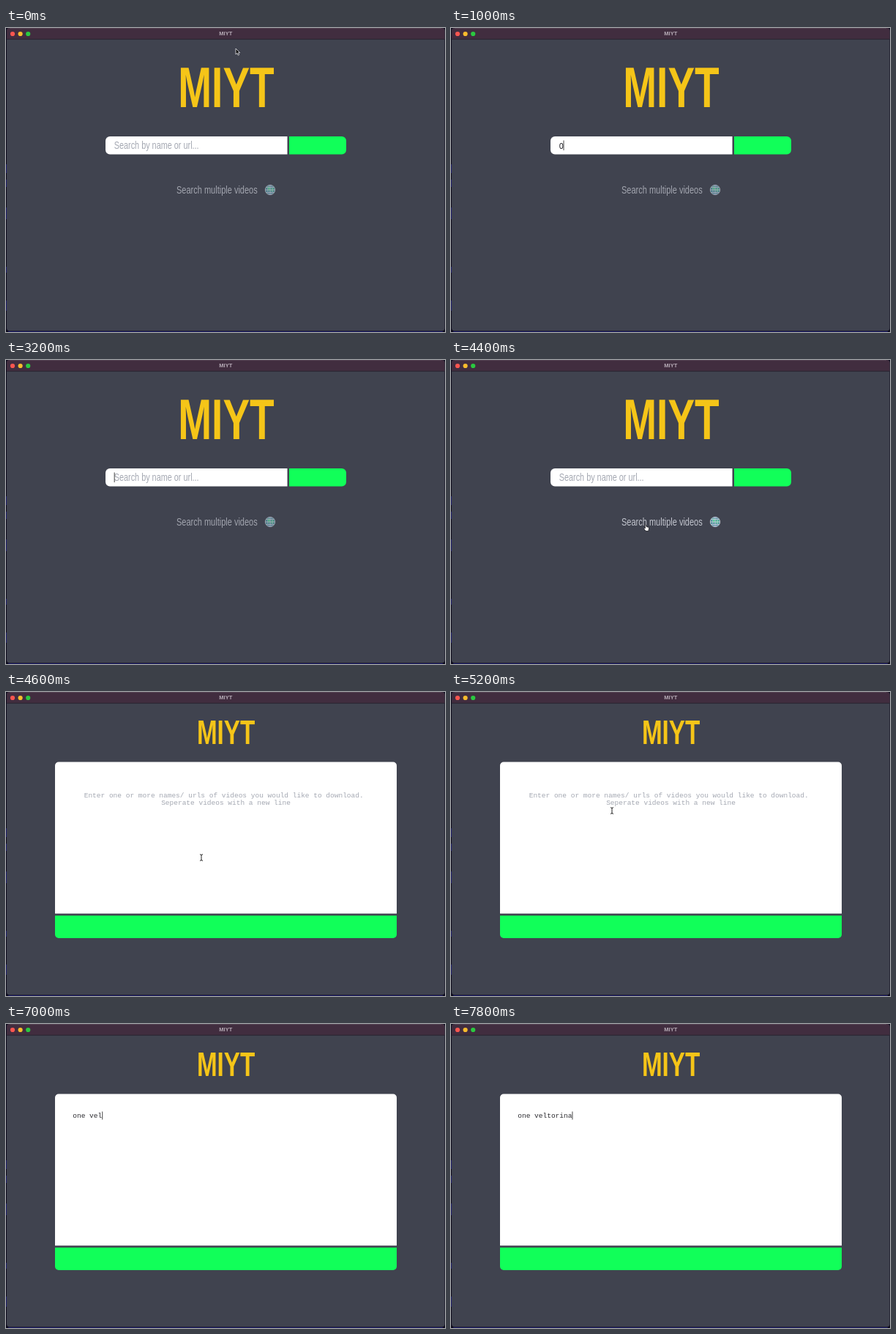
These frames come from a looping animation (600x415 px, 8 s). An HTML page:

```html
<!DOCTYPE html>
<html lang="en">
<head>
<meta charset="utf-8">
<title>MIYT</title>
<style>
  html, body { margin: 0; width: 100%; height: 100%; overflow: hidden; background: #0c0a1c; }
  svg { display: block; width: 100%; height: 100%; }
  text { font-family: "Liberation Sans", Arial, sans-serif; white-space: pre; }
  .mono { font: 9.5px "Liberation Mono", "Courier New", monospace; }
  .logo { font-weight: 700; fill: #f5c518; text-anchor: middle; }
  .hint { fill: #a4a8b2; }
  .ink { fill: #2b2b30; }
  .mid { text-anchor: middle; }
</style>
</head>
<body>
<svg viewBox="0 0 600 415">
  <rect width="600" height="415" fill="#0c0a1c"/>
  <path d="M.4 186v12M.4 207v10M.4 245v16M.4 326v8M.4 372v14M3 414.6H597" stroke="#20207a" stroke-width=".9"/>
  <rect x="1" width="598.5" height="413.5" rx="4" fill="#40434f"/>
  <path d="M1 15V4a4 4 0 0 1 4-4H595.5a4 4 0 0 1 4 4V15Z" fill="#412d3f"/>
  <path d="M5 .5H595" stroke="#5b4859" stroke-width=".7"/>
  <path d="M1 15.3H599.5" stroke="#292431"/>
  <circle cx="9" cy="8" r="3.1" fill="#fb5650"/>
  <circle cx="19.6" cy="8" r="3.1" fill="#f9bb2d"/>
  <circle cx="30.2" cy="8" r="3.1" fill="#2bc840"/>
  <text class="mid" x="300.3" y="10.3" font-size="7.5" font-weight="700" fill="#b8adb8">MIYT</text>

  <g id="home">
    <text class="logo" font-size="77" transform="translate(301 108) scale(.715 1)">MIYT</text>
    <path d="M384.5 148H142a6 6 0 0 0-6 6v12.5a6 6 0 0 0 6 6H384.5Z" fill="#fff"/>
    <path d="M387 148H459a6 6 0 0 1 6 6v12.5a6 6 0 0 1-6 6H387Z" fill="#11ff59"/>
    <text id="query" font-size="15.2" transform="translate(147.7 165) scale(.715 1)"></text>
    <g id="link">
      <text font-size="15.4" fill="#c3c6cf" transform="translate(233 226) scale(.715 1)">Search multiple videos</text>
      <g transform="translate(361 221)" fill="none" stroke-width=".8">
        <circle r="6.7" fill="#4b8f9b" stroke="#cfd3dc"/>
        <path d="M-4-4L-1-5 0-1-3 2ZM2-3L5-2 4 3 1 1Z" fill="#46d08a"/>
        <path d="M-6.5 0H6.5M0-6.5V6.5M-5.5-3.4H5.5M-5.5 3.4H5.5" stroke="#d5d8e2"/>
        <ellipse rx="3.3" ry="6.5" stroke="#b9b4dc"/>
      </g>
    </g>
  </g>

  <g id="multi">
    <text class="logo" font-size="46.5" transform="translate(300.6 71) scale(.715 1)">MIYT</text>
    <path d="M67 302.5V100.500a5 5 0 0 1 5-5H529a5 5 0 0 1 5 5V302.500Z" fill="#fff"/>
    <path d="M67 305.300H534V331a5 5 0 0 1-5 5H72a5 5 0 0 1-5-5Z" fill="#11ff59"/>
    <g id="help" class="hint">
      <text class="mono mid" x="297.700" y="143.500">Enter one or more names/ urls of videos you would like to download.</text>
      <text class="mono mid" x="300.500" y="154.300">Seperate videos with a new line</text>
    </g>
    <text id="list" class="mono ink" x="91.300" y="128.300"></text>
  </g>

  <rect id="caret" width=".9" fill="#333"/>
  <g id="pointer">
    <path id="arrow" d="M0 0V8L1.900 6.300 3.200 9.200 4.600 8.600 3.300 5.800H5.800Z" fill="#111" stroke="#e8e8ec" stroke-width=".8"/>
    <path id="beam" d="M-2-4.300Q0-4.300 0-3Q0-4.300 2-4.300M0-3V3M-2 4.300Q0 4.300 0 3Q0 4.300 2 4.300" fill="none" stroke="#222"/>
    <path id="hand" d="M-2-4.500Q-1.200-5.300-.6-4.300L.2-1.800 2.600-1.300Q3.800-.9 3.500.8L2.800 4H-.8L-3.300.8Q-3.300-.4-1.500.2Z" fill="#fff" stroke="#1b1b20" stroke-width=".8"/>
  </g>
</svg>
<script>
const LOOP = 8000, SWITCH = 4600;
const QUERY = "one", LIST = "one veltorina", PROMPT = "Search by name or url...";
const $ = id => document.getElementById(id);
const show = (id, on) => $(id).style.display = on ? "" : "none";

// Each row: start time, then its values
const queryLength = [[0, 0], [1000, 1], [1600, 2], [2000, 3], [2800, 2], [3000, 1], [3200, 0]];
const listLength = [[0, 0], [5800, 1], [6000, 2], [6200, 3], [6400, 4], [6600, 5], [6800, 6],
  [7000, 7], [7200, 8], [7400, 10], [7600, 11], [7800, 13]];
const caretOn = [[0, false], [1000, true], [1400, false], [1600, true], [3600, false], [5400, true]];
const pointer = [
  [0, "arrow", 314, 28], [200, "arrow", 325, 66], [400, "arrow", 350, 125], [600, "beam", 376, 161],
  [1000, ""], [3600, "beam", 370, 164], [3800, "arrow", 340, 184], [4000, "arrow", 300, 207],
  [4200, "hand", 275, 226], [4400, "hand", 267, 229.5], [4600, "beam", 267, 226],
  [4800, "beam", 258, 208], [5000, "beam", 236, 180], [5200, "beam", 220, 162], [5800, ""]
];

const at = (rows, t) => rows.findLast(row => row[0] <= t).slice(1);

function draw(t) {
  const home = t < SWITCH;
  const [typed] = at(queryLength, t), [listed] = at(listLength, t);
  const [kind, x, y] = at(pointer, t);

  show("home", home);
  show("multi", !home);
  show("help", listed === 0);
  $("query").textContent = typed ? QUERY.slice(0, typed) : PROMPT;
  $("query").setAttribute("class", typed ? "ink" : "hint");
  $("list").textContent = LIST.slice(0, listed);
  $("link").style.opacity = home && kind === "hand" ? 1 : 0.75;

  const caret = $("caret");
  show("caret", at(caretOn, t)[0]);
  caret.setAttribute("x", home ? 147.7 + typed * 5.85 : 91.4 + listed * 5.7);
  caret.setAttribute("y", home ? 153.5 : 119.5);
  caret.setAttribute("height", home ? 13.5 : 11);

  for (const id of ["arrow", "beam", "hand"]) show(id, id === kind);
  if (kind) $("pointer").setAttribute("transform", `translate(${x} ${y})`);
}

const start = performance.now();
function tick() {
  draw((performance.now() - start) % LOOP);
  requestAnimationFrame(tick);
}
tick();
</script>
</body>
</html>
```
